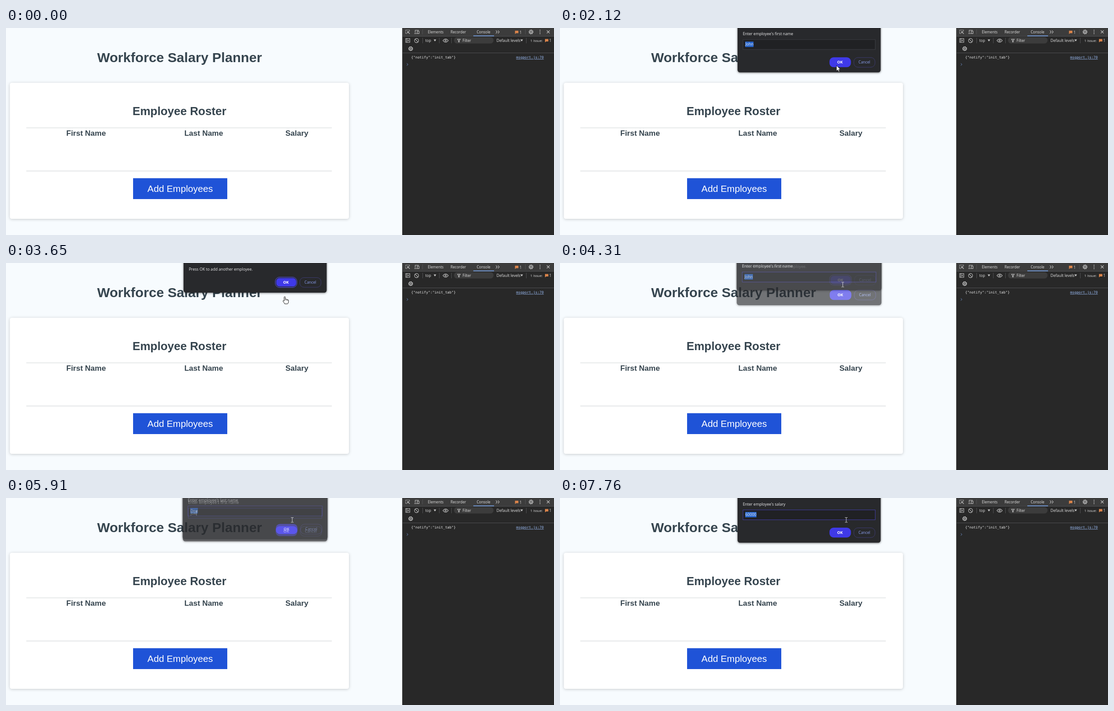
An HTML page that plays this animation: 1216 by 461 pixels, repeating every 8000 ms.

```html
<!DOCTYPE html>
<html lang="en">
<head>
<meta charset="utf-8">
<title>Payroll prompts</title>
<style>
  html, body { margin: 0; width: 100%; height: 100%; overflow: hidden; background: #f7fbfe; }
  svg { display: block; width: 1216px; height: 461px; }
  text { white-space: pre; }
  .page { font-family: "Liberation Sans", Arial, sans-serif; font-weight: 700; fill: #36454f; }
  .ui { font: 8.1px "Open Sans", "Noto Sans", sans-serif; fill: #e3e3e3; }
  .mono { font: 7.83px "DejaVu Sans Mono", monospace; fill: #e8e8e8; }
  .icon { fill: none; stroke: #c7c7c7; stroke-width: 1.1; }
  .solid { fill: #c7c7c7; }
  .rule { stroke: #505153; }
  .card { filter: drop-shadow(0 1px 3px rgba(0, 0, 0, .2)); }
  .panel { fill: #28292c; filter: drop-shadow(0 1px 2px rgba(0, 0, 0, .55)); }
  .dialog text { font: 8.6px "Open Sans", "Noto Sans", sans-serif; fill: #f0f0f1; }
  .dialog .ok { font-weight: 700; fill: #fff; text-anchor: middle; }
  .dialog .cancel { font-size: 8.4px; fill: #8ea2f4; text-anchor: middle; }
  .cursor { stroke-linejoin: round; }
</style>
</head>
<body>
<svg viewBox="0 0 1216 461">
  <defs>
    <g id="gear" class="icon">
      <circle r="3.6" stroke-width="1.3"/>
      <circle r="4.5" stroke-width="1.5" stroke-dasharray="1.76 1.76"/>
      <circle r="1.2"/>
    </g>
    <path id="badge" fill="#d9834a" d="M0 0h7.5v5.5h-5l-2.5 2z"/>
    <path id="down" class="solid" d="M0 0h5.6l-2.8 4.6z"/>
  </defs>

  <rect width="880" height="461" fill="#f7fbfe"/>
  <rect class="card" x="8.5" y="122" width="752.5" height="303" rx="4.5" fill="#fff"/>
  <g class="page">
    <text x="385" y="75.7" font-size="30.1" text-anchor="middle">Workforce Salary Planner</text>
    <text x="384.8" y="194" font-size="25.5" text-anchor="middle">Employee Roster</text>
    <g font-size="17" text-anchor="middle">
      <text x="177.7" y="240">First Name</text>
      <text x="438.7" y="240">Last Name</text>
      <text x="645.5" y="240">Salary</text>
    </g>
    <path d="M45 222.3H723M45 318.5H723" stroke="#e4e6e7" stroke-width="1.8"/>
    <rect x="282" y="334.5" width="209" height="46.5" fill="#1f53d7"/>
    <text x="386.5" y="365" font-size="20.75" font-weight="400" text-anchor="middle" style="fill:#fff">Add Employees</text>
  </g>

  <rect x="879.5" width="337" height="461" fill="#282828"/>
  <rect x="880" width="336" height="18" fill="#3c3c3c"/>
  <path class="rule" d="M880 18.5H1216M880 55.5H1216M879.5 0V461"/>
  <path class="rule" d="M924.5 3v11M1152.5 3v11M924.5 22v12M961.5 22v12M988.5 22v12M1154.5 22v12"/>
  <path d="M1037 17.5h46" stroke="#7cacf8" stroke-width="1.6"/>
  <rect x="994" y="20.5" width="88" height="14" rx="7" fill="#3c3c3c"/>

  <g class="icon">
    <path d="M895.5 7V4.500H887V12.500H890" stroke-dasharray="1.6 .8"/>
    <path d="M891 8l5 5M891 12V8h4"/>
    <path d="M908 11V5h8M906 12.500h5.500M912.500 7h4v5.500h-4z"/>
    <path d="M1087 5.500l3 3.300-3 3.300M1091.500 5.500l3 3.300-3 3.300"/>
    <path d="M1200 5.500l6.400 6.400M1206.400 5.500l-6.400 6.400"/>
    <path d="M887 23.500h9v8.500h-9zM889.700 23.500v8.500M894 26l-2 1.800 2 1.800"/>
    <circle cx="911" cy="28" r="4.600"/><path d="M907.800 24.800l6.400 6.400"/>
    <path d="M969.500 28q6-7.500 12 0q-6 7.500-12 0z"/><circle cx="975.500" cy="28" r="1.600"/>
    <path d="M1002 25h6l-2.300 3.200v3h-1.400v-3z"/>
  </g>
  <g class="solid">
    <circle cx="1185" cy="5" r="1"/><circle cx="1185" cy="8.800" r="1"/><circle cx="1185" cy="12.600" r="1"/>
  </g>
  <use href="#gear" x="1165" y="8.700"/>
  <use href="#gear" x="898" y="46"/>
  <use href="#badge" x="1129.500" y="6"/>
  <use href="#badge" x="1196" y="24.500"/>
  <use href="#down" x="949" y="25.500"/>
  <use href="#down" x="1141.500" y="25.500"/>

  <g class="ui">
    <text x="936" y="12">Elements</text>
    <text x="986.5" y="12">Recorder</text>
    <text x="1044.500" y="12">Console</text>
    <text x="1139.500" y="12.500">1</text>
    <text x="930.500" y="31">top</text>
    <text x="1013" y="31">Filter</text>
    <text x="1088.500" y="31" font-size="8.500" style="font-size:8.5px">Default levels</text>
    <text x="1163.500" y="31" style="font-size:7.8px">1 Issue:</text>
    <text x="1205.500" y="31">1</text>
  </g>
  <g class="mono">
    <text x="899" y="68.300">{"notify":"init_tab"}</text>
    <text x="1132" y="68.300" text-decoration="underline" style="fill:#9bbcf5">msgport.js:70</text>
  </g>
  <path d="M889.500 78.700l2.400 2.500-2.400 2.500" fill="none" stroke="#6f8fc9"/>

  <g id="dialogs"></g>

  <path id="arrow" class="cursor" d="M0 0V12.300L2.900 9.700L4.900 14L6.900 13.100L5 8.900H8.700Z" fill="#fff" stroke="#111" stroke-width=".8"/>
  <g id="hand" class="cursor" stroke="#111" stroke-width="1">
    <path d="M-1.300 1.200Q0-.8 1.300 1.200V6Q3.500 5.300 3.900 6.600Q6 6 6.300 7.400Q8.300 7 8.300 9V12Q8 15 6.300 16.500H-.2Q-1.200 13.800-3.600 11.200Q-4.500 9.300-3 9Q-2 9-1.300 10.200Z" fill="#fff"/>
    <path d="M1.300 6V9M3.900 6.600V9.300M6.300 7.400V9.600" stroke-width=".7"/>
  </g>
  <path id="beam" class="cursor" d="M-2.800-5.300H-.6L0-4.800L.6-5.300H2.800M0-4.800V4.800M-2.800 5.300H-.6L0 4.800L.6 5.300H2.800" fill="none" stroke="#d6d6d8"/>
</svg>

<script>
const LOOP = 8000;
const $ = id => document.getElementById(id);

// Each dialog opens over `open`, is clicked at `press`, and leaves as the next one opens.
const first = { label: "Enter employee's first name", value: "John" };
const last = { label: "Enter employee's last name", value: "Doe" };
const salary = { label: "Enter employee's salary", value: "60000" };
const again = { label: "Press OK to add another employee." };
const dialogs = [
  { ...first, open: [1110, 1320], press: 1990 },
  { ...last, open: [2170, 2450], press: 2650 },
  { ...salary, open: [2720, 2980], press: 3180 },
  { ...again, open: [3250, 3510] },
  { ...first, open: [4150, 4440], keys: [5180, 5310, 5450], typed: "joe" },
  { ...last, open: [5830, 6040], keys: [6230, 6360, 6430, 6560, 6700, 6960], typed: "bloggs" },
  { ...salary, open: [7490, 7750] }
];

// time, x, y of the pointer's hot spot
const path = [
  [190, 984, 437], [400, 773, 368], [640, 560, 287], [780, 470, 272], [990, 387, 358],
  [1180, 387, 358], [1500, 500, 220], [1750, 590, 108], [1920, 613.5, 83.5],
  [2190, 613.5, 83.5], [2450, 618.5, 78.5], [3350, 618.5, 78.5], [3500, 618.5, 74.5],
  [3680, 618.5, 74.5], [3980, 626, 47], [4440, 628, 48.5], [4560, 628, 48.5],
  [4650, 634.5, 48.7], [4840, 635.2, 48.8]
];
const shapes = [[190, ""], [880, "arrow"], [1250, "hand"], [3400, "arrow"], [3900, "hand"], [4300, "arrow"], [LOOP, "beam"]];

function add(parent, tag, attrs, text = "") {
  const node = document.createElementNS("http://www.w3.org/2000/svg", tag);
  for (const key in attrs) node.setAttribute(key, attrs[key]);
  node.textContent = text;
  return parent.appendChild(node);
}

function build(d) {
  const g = d.node = add($("dialogs"), "g", { class: "dialog", opacity: 0 });
  const prompt = "value" in d;
  const height = prompt ? 99.5 : 66;
  const y = prompt ? 66 : 32;
  add(g, "rect", { class: "panel", x: 394, y: -30, width: 317.5, height: height + 30, rx: 5.5 });
  add(g, "text", { x: 405.7, y: 16.8 }, d.label);
  if (prompt) {
    d.field = add(g, "rect", { x: 406, y: 26.5, width: 293.500, height: 22, fill: "#202124" });
    d.mark = add(g, "rect", { x: 411, y: 31, height: 12, fill: "#2866cd" });
    d.text = add(g, "text", { x: 411.2, y: 40.2 }, d.value);
    d.caret = add(g, "rect", { y: 31.5, width: 1, height: 11, fill: "#fff" });
  } else {
    add(g, "rect", { x: 597.5, y: y - .5, width: 48, height: 23, rx: 9.5, fill: "none", stroke: "#5550e8" });
  }
  const inset = prompt ? 0 : 1.5;
  add(g, "rect", { x: 598 + inset, y: y + inset, width: 47.5 - 2 * inset, height: 22 - 2 * inset, rx: 9 - inset, fill: "#3f39e8" });
  add(g, "rect", { x: 652, y: y + .5, width: 47, height: 21.500, rx: 9, fill: "none", stroke: "#3d3b70" });
  add(g, "text", { class: "ok", x: 621.3, y: y + 13.8 }, "OK");
  add(g, "text", { class: "cancel", x: 675.3, y: y + 13.800 }, "Cancel");
}

const ramp = (t, [a, b]) => Math.min(1, Math.max(0, (t - a) / (b - a)));

function drawDialog(d, next, t) {
  const enter = ramp(t, d.open);
  const leave = next ? ramp(t, next.open) : 0;
  const pressed = t >= d.press;
  const away = 1 - enter + leave;
  const shift = -15 * (1 - enter) - 10 * leave - (pressed ? .7 : 0);
  const scale = 1 + .025 * away;
  d.node.setAttribute("opacity", (enter * (1 - leave)) ** .75);
  d.node.setAttribute("transform", `translate(552.700 ${shift}) scale(${scale}) translate(-552.700 0)`);
  if (!d.field) return;

  const count = (d.keys || []).filter(k => t >= k).length;
  d.text.textContent = count ? d.typed.slice(0, count) : d.value;
  const width = d.text.getComputedTextLength();
  d.mark.setAttribute("width", count ? 0 : width + .4);
  d.caret.setAttribute("x", 411.3 + width);
  d.caret.setAttribute("opacity", count ? 1 : 0);
  d.field.setAttribute("stroke", pressed ? "#3c3e43" : "#403da0");
}

function pointerAt(t) {
  const i = path.findIndex(p => p[0] > t);
  if (i < 0) return path[path.length - 1].slice(1);
  if (i === 0) return path[0].slice(1);
  const [a, b] = [path[i - 1], path[i]];
  const k = ramp(t, [a[0], b[0]]);
  return [a[1] + (b[1] - a[1]) * k, a[2] + (b[2] - a[2]) * k];
}

function draw(t) {
  dialogs.forEach((d, i) => drawDialog(d, dialogs[i + 1], t));
  const [x, y] = pointerAt(t);
  const shape = shapes.find(s => t < s[0])[1];
  for (const id of ["arrow", "hand", "beam"]) {
    $(id).setAttribute("transform", `translate(${x} ${y})`);
    $(id).setAttribute("visibility", id === shape ? "visible" : "hidden");
  }
}

dialogs.forEach(build);
const start = performance.now();
function tick() {
  draw((performance.now() - start) % LOOP);
  requestAnimationFrame(tick);
}
tick();
</script>
</body>
</html>
```
